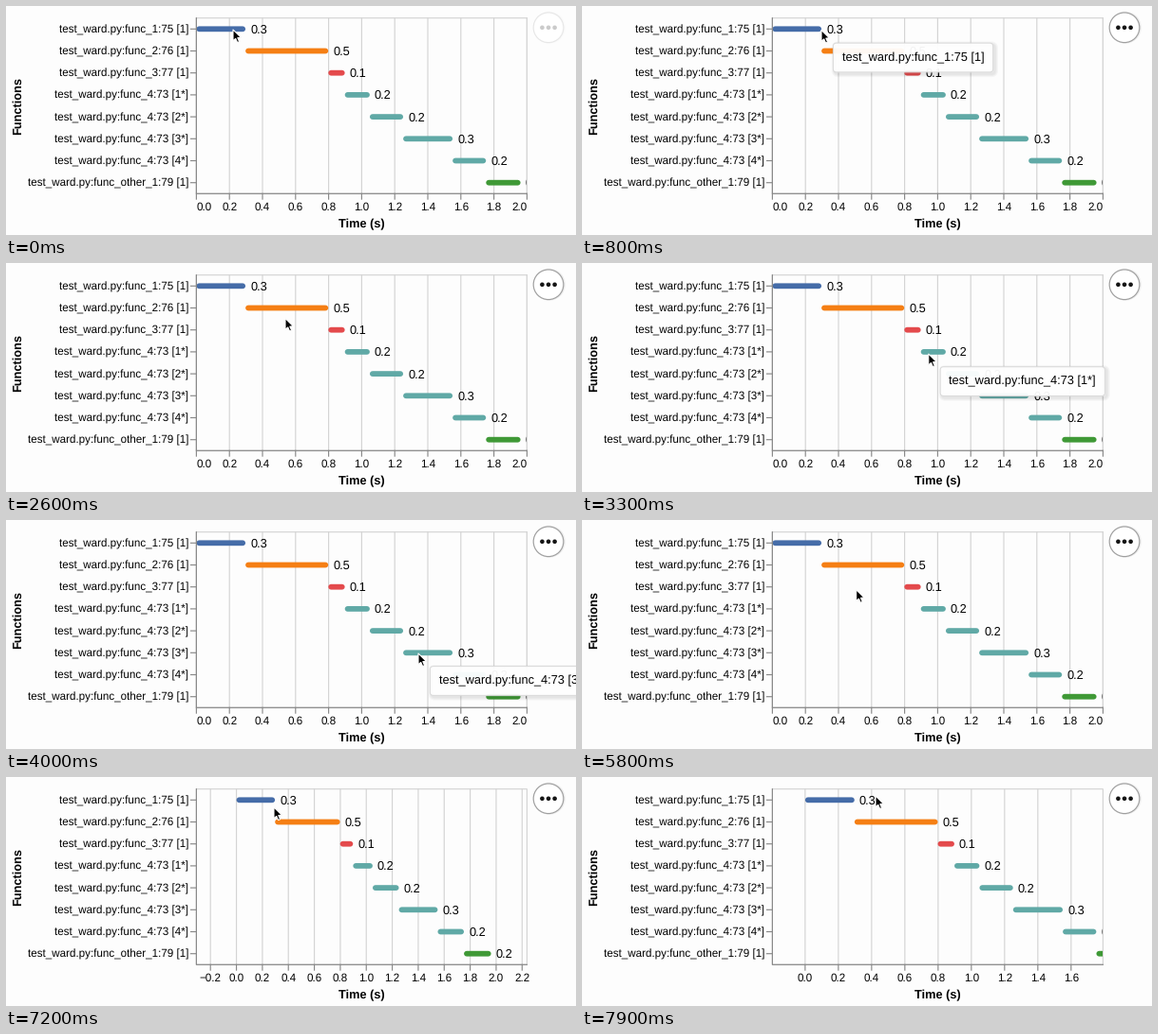
Write a matplotlib script that moves like this. It is 600 px wide and 242 px high and loops after 8000 ms.

```python
import numpy as np
import matplotlib.pyplot as plt
from matplotlib.animation import FuncAnimation
from matplotlib.patches import Circle, Polygon, Rectangle
from matplotlib.patheffects import Normal, Stroke

W, H, DPI = 600, 242, 100
STEP, FRAMES = 100, 80
PT = 72 / DPI
ZOOM = 1.16                      # page zoom applied to all chart sizes
LEFT, TOP, ROWS = 200.4, 12.7, 8
PITCH, TICK = 20 * ZOOM, 5 * ZOOM
RIGHT, BOTTOM = LEFT + 300 * ZOOM, TOP + ROWS * PITCH
LABEL, TITLE = 10 * ZOOM, 11 * ZOOM
SCALE = 150 * ZOOM               # pixels per second before zooming
GRID, AXIS, INK = "#d4d4d4", "#888888", "black"
BLUE, ORANGE, RED, TEAL, GREEN = (
    "#456ca8", "#f57f14", "#e44a4c", "#60a9a6", "#3f9936")

# Calls run back to back: name, line, tag, duration (s), colour
CALLS = [("func_1", 75, "1", 0.297, BLUE),
         ("func_2", 76, "1", 0.501, ORANGE),
         ("func_3", 77, "1", 0.100, RED)]
CALLS += [("func_4", 73, f"{n}*", d, TEAL)
          for n, d in enumerate((0.151, 0.202, 0.299, 0.202), 1)]
CALLS += [("func_other_1", 79, "1", 0.209, GREEN)]

# Pointer moves: begin and end (ms), destination
START = (239, 25)
MOVES = [(500, 800, 252, 25.5), (1400, 2300, 265, 48), (2500, 2700, 323, 69),
         (2800, 4000, 434, 141), (4200, 4400, 399, 150),
         (4900, 5400, 280, 71), (5700, 6300, 397, 108),
         (6900, 7200, 282, 32), (7400, 7900, 309, 20)]

# Wheel zooms: begin and end (ms), fixed x, factor
WHEELS = [(6200, 6940, 397, 0.7856), (7400, 7900, 270, 1.28)]

ARROW = np.array([(0, 0), (0, 11.8), (2.7, 9.4), (4.6, 13.6),
                  (6.6, 12.7), (4.8, 8.6), (8.4, 8.3)])

plt.rcParams["font.family"] = "Liberation Sans"
plt.rcParams["text.hinting"] = "none"
fig = plt.figure(figsize=(W / DPI, H / DPI), dpi=DPI, facecolor="#fdfdfd")
ax = fig.add_axes([0, 0, 1, 1])


def progress(t, begin, end):
    return np.clip((t - begin) / (end - begin), 0, 1)


def pointer(t):
    pos = np.array(START, float)
    for begin, end, *goal in MOVES:
        u = progress(t, begin, end)
        pos += (np.array(goal) - pos) * u * u * (3 - 2 * u)
    return pos


def view(t):
    """Pixel position of zero and pixels per second."""
    zero, scale = LEFT, SCALE
    for begin, end, x, factor in WHEELS:
        ease = 1 - (1 - progress(t, begin, end)) ** 2
        k = 1 + (factor - 1) * ease
        zero, scale = x + (zero - x) * k, scale * k
    return zero, scale


def layout(zero, scale):
    """Yield label, row centre, bar ends, shown duration and colour."""
    start = 0
    for row, (func, line_no, tag, took, color) in enumerate(CALLS):
        label = f"test_ward.py:{func}:{line_no} [{tag}]"
        y = TOP + (row + 0.5) * PITCH
        x0, x1 = zero + start * scale, zero + (start + took) * scale
        yield label, y, x0, x1, f"{took:.1f}", color
        start += took


def line(xs, ys, color, width=ZOOM, **kw):
    return ax.plot(xs, ys, color=color, lw=width * PT, snap=False, **kw)[0]


def text(x, y, s, px, **kw):
    """Text whose digits are centred on y."""
    return ax.text(x, y + 0.34 * px, s, fontsize=px * PT, color=INK,
                   va="baseline", **kw)


def draw_axes(zero, scale):
    first = np.ceil((LEFT - zero) / scale * 5 - 1e-6)
    last = np.floor((RIGHT - zero) / scale * 5 + 1e-6)
    for k in np.arange(first, last + 1):
        x = zero + k / 5 * scale
        line([x, x], [TOP, BOTTOM], GRID, zorder=1)
        line([x, x], [BOTTOM, BOTTOM + TICK], AXIS, zorder=4)
        # End labels stay flush with the plot
        ha = "left" if x < LEFT + 1 else "right" if x > RIGHT - 1 else "center"
        sign = "\u2212" if k < 0 else ""
        text(x, BOTTOM + 14, f"{sign}{abs(k) / 5:.1f}", LABEL, ha=ha)
    line([LEFT, LEFT, RIGHT], [TOP, BOTTOM, BOTTOM], AXIS, zorder=4)
    text((LEFT + RIGHT) / 2, 229.7, "Time (s)", TITLE,
         ha="center", weight="bold")
    ax.text(12.3, (TOP + BOTTOM) / 2, "Functions", fontsize=TITLE * PT,
            weight="bold", rotation=90, ha="center", va="center")


def draw_calls(calls, frame):
    r = 2.5 * ZOOM
    for label, y, x0, x1, took, color in calls:
        line([LEFT - TICK, LEFT], [y, y], AXIS, zorder=4)
        text(LEFT - 7 * ZOOM, y, label, LABEL, ha="right")
        bar = line([x0 + r, x1 - r], [y, y], color, 2 * r,
                   solid_capstyle="round", zorder=3)
        value = text(x1 + 5, y, took, TITLE, zorder=5, clip_on=True)
        for part in (bar, value):
            part.set_clip_path(frame)


def draw_menu(alpha):
    x, y = 571, 22.8

    def disc(dx, r, **kw):
        ax.add_patch(Circle((x + dx, y), r, **kw))

    disc(0.7, 17, fc=INK, ec="none", alpha=0.07 * alpha)
    disc(0, 15.8, fc="white", ec="none")
    disc(0, 15.8, fc="none", ec="#a0a0a0", lw=ZOOM * PT, alpha=alpha)
    for dx in (-6.6, 0, 6.6):
        disc(dx, 2.3, fc="#151515", ec="none", alpha=alpha)


def draw_tooltip(px, py, label):
    shadow = [Stroke(linewidth=w, foreground=INK, alpha=0.03,
                     offset=(1.3, -1.3)) for w in (5, 3.4, 1.8)]
    box = dict(boxstyle="round,pad=0.73,rounding_size=0.27",
               fc=(1, 1, 1, 0.95), ec="#d9d9d9", lw=PT,
               path_effects=shadow + [Normal()])
    ax.text(px + 21.7, py + 29, label, fontsize=TITLE * PT, va="center",
            bbox=box, zorder=10)


def update(i):
    t = i * STEP
    px, py = pointer(t)
    zero, scale = view(t)
    calls = list(layout(zero, scale))
    ax.clear()
    ax.set(xlim=(0, W), ylim=(H, 0))
    ax.axis("off")
    frame = ax.add_patch(Rectangle(
        (LEFT, TOP), RIGHT - LEFT, BOTTOM - TOP,
        fc="none", ec=GRID, lw=ZOOM * PT, snap=False))
    draw_axes(zero, scale)
    draw_calls(calls, frame)
    active = progress(t, 500, 800)
    draw_menu(0.22 + 0.78 * active)
    for label, y, x0, x1, *_ in calls:
        if active == 1 and x0 <= px <= x1 and abs(py - y) <= 3.2:
            draw_tooltip(px, py, label)
    ax.add_patch(Polygon(ARROW + (px, py), fc=INK, ec="white",
                         lw=1.1 * PT, joinstyle="round", zorder=12))
    return []


anim = FuncAnimation(fig, update, frames=FRAMES, interval=STEP,
                     repeat=True, repeat_delay=0)
plt.show()
```
